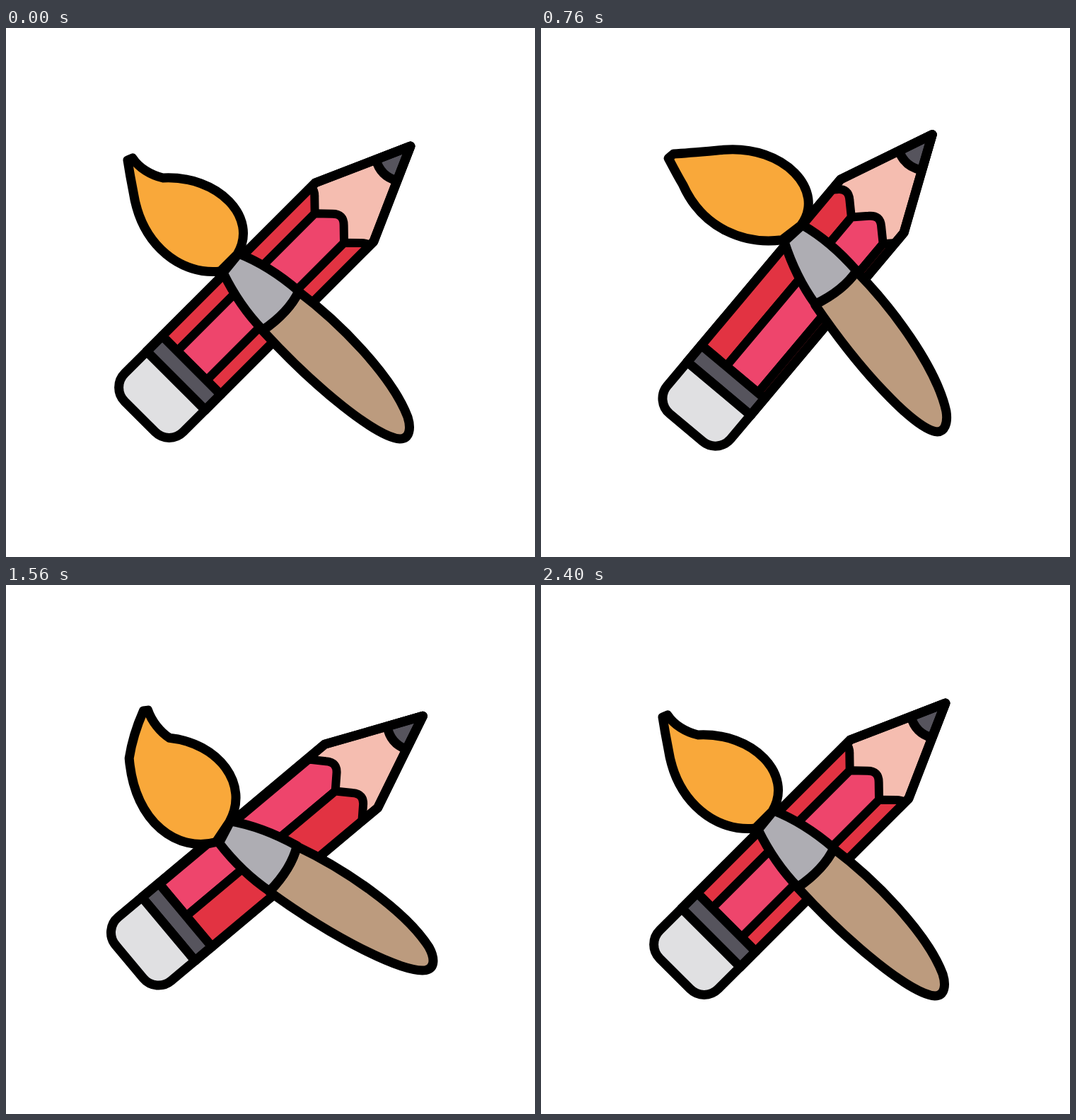
Animation of 748 by 748 pixels, one loop 2.84 s. Source, as an HTML page:

```html
<!DOCTYPE html>
<html lang="en">
<head>
<meta charset="utf-8">
<title>Pencil and brush</title>
<style>
html, body { margin: 0; width: 100%; height: 100%; overflow: hidden; background: #fff; }
svg { display: block; width: 100vw; height: 100vh; }
path { stroke: #000; stroke-width: 13; stroke-linejoin: round; stroke-linecap: round; }
#stripes path { stroke-width: 12; }
</style>
</head>
<body>
<svg viewBox="0 0 748 748">
  <clipPath id="body"><rect x="-174" y="-58.5" width="330" height="117"/></clipPath>
  <g id="pencil">
    <path fill="#f5bdb0" d="M-168-58.5H138L270 0 138 58.5H-168Z"/>
    <path fill="#56545d" stroke-width="11" d="M222-21Q210 0 222 21L270 0Z"/>
    <g clip-path="url(#body)"><g id="stripes"></g></g>
    <path fill="#56545d" d="M-199-58.5H-168V58.5H-199Z"/>
    <path fill="#e0e0e2" d="M-199-58.5H-243A28 28 0 0 0-271-30.5V30.5A28 28 0 0 0-243 58.5H-199Z"/>
    <path fill="none" d="M-199-58.5H138L270 0 138 58.5H-199"/>
  </g>
  <g id="brush">
    <path fill="#bc9b7e" d="M414 373C470 415 545 490 568 550C573 566 571 581 557 581C525 579 440 512 363 428Q400 402 414 373Z"/>
    <path fill="#aeadb3" d="M329 319Q372 336 414 372Q400 402 363 427Q330 393 307 346Z"/>
    <path id="hair" fill="#f9a83a"/>
  </g>
</svg>
<script>
const LOOP = 2840, STEP = 20;
const STRIPE = 58.5, REPEAT = 2 * STRIPE;
const $ = id => document.getElementById(id);
const lerp = (a, b, u) => a + (b - a) * u;
const linear = u => u;
const smooth = u => u * u * (3 - 2 * u);

// Value at time t of a track of [time, value] keys.
function track(keys, t, ease) {
  const next = keys.findIndex(([time]) => t < time);
  if (next < 0) return keys[keys.length - 1][1];
  if (next === 0) return keys[0][1];
  const [t0, a] = keys[next - 1], [t1, b] = keys[next];
  return lerp(a, b, ease((t - t0) / (t1 - t0)));
}

const swing = [[0, 0], [440, 8], [810, -7], [1330, 10], [1795, 0]];
const roll = [[0, 0], [440, 1], [810, 0], [1330, 1.5], [1795, 0]];
const tilt = [[280, 0], [680, 8.9], [1460, -12], [2400, 0]];
const slide = [[220, 0], [880, 36.5], [1620, -4], [2400, 0]];
const bend = [[300, 0], [840, -1.05], [1460, 1.05], [2400, 0]];

// Bristles at rest: curve points of the upper edge, then of the lower edge.
const NECK = [319, 333], LENGTH = 205;
const UPPER = [[179, 184], [188, 198], [205, 208], [222, 212], [300, 208], [358, 268], [327, 320]];
const LOWER = [[303, 344], [250, 350], [192, 310], [180, 232], [177, 217], [174, 200], [172, 187]];

// Turns a point around the neck, more so near the tip; the edges bow to opposite sides.
function flex([px, py], b, side) {
  const x = px - NECK[0], y = py - NECK[1];
  const r = Math.hypot(x, y) / LENGTH;
  const bow = 34 * r * r * Math.max(0, 1 - r);
  const a = (22 * b * r ** 1.5 + side * bow * b * b) * Math.PI / 180;
  const c = Math.cos(a), s = Math.sin(a);
  return [NECK[0] + x * c - y * s, NECK[1] + x * s + y * c];
}

function hairPath(b) {
  const [u0, ...upper] = UPPER.map(p => flex(p, b, 1));
  const [l0, ...lower] = LOWER.map(p => flex(p, b, -1));
  return `M${u0}C${upper.join(' ')}L${l0}C${lower.join(' ')}Z`;
}

// Scalloped stripes, repeated across the body.
for (let i = -4; i <= 1; i++) {
  const el = document.createElementNS('http://www.w3.org/2000/svg', 'path');
  const v = s => (i + s - .5) * STRIPE;
  el.setAttribute('fill', i % 2 ? '#e23342' : '#ee456c');
  el.setAttribute('d',
    `M-168 ${v(0)}H107L124 ${v(.3)}Q136 ${v(.5)} 124 ${v(.7)}L107 ${v(1)}H-168Z`);
  $('stripes').appendChild(el);
}

function draw(t) {
  $('pencil').setAttribute('transform',
    `rotate(${track(swing, t, linear)} 374 374) translate(381 358) rotate(-45)`);
  const shift = track(roll, t, linear) % 1 * REPEAT;
  $('stripes').setAttribute('transform', `translate(0 ${shift + 1})`);
  const d = track(slide, t, smooth);
  $('brush').setAttribute('transform',
    `translate(${d} ${-d}) rotate(${track(tilt, t, smooth)} 382 366)`);
  $('hair').setAttribute('d', hairPath(track(bend, t, smooth)));
}

const start = performance.now();
function tick() {
  const t = (performance.now() - start) % LOOP;
  draw(Math.floor(t / STEP) * STEP);
  requestAnimationFrame(tick);
}
draw(0);
requestAnimationFrame(tick);
</script>
</body>
</html>
```
